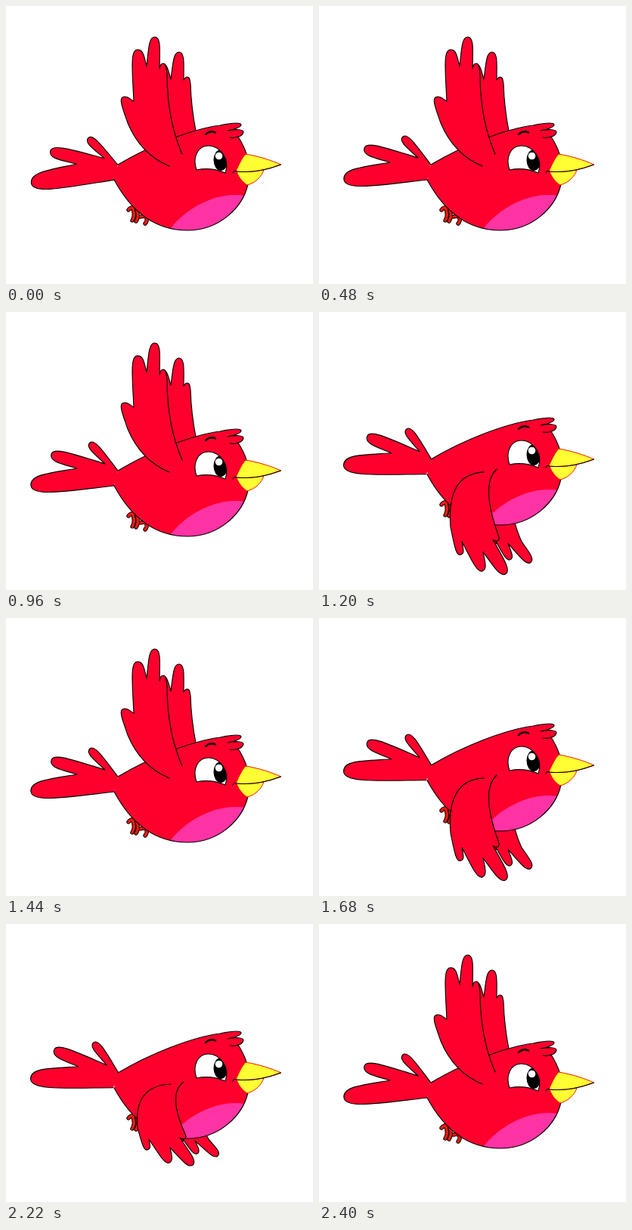
These frames come from a looping animation (406 by 368 pixels, 2.43 s). An HTML page:

```html
<!DOCTYPE html>
<html lang="en">
<head>
<meta charset="utf-8">
<title>Flying bird</title>
<style>
  html, body { margin: 0; width: 100%; height: 100%; overflow: hidden; background: #fff; }
  svg { display: block; width: 100vw; height: 100vh; }
  .red { fill: #ff002d; }
  .line { stroke: #000; stroke-width: 1.15; stroke-linejoin: round; stroke-linecap: round; }
  .bare { fill: none; }
  .toes { fill: none; stroke: #000; stroke-width: 5.4; stroke-linecap: round; stroke-linejoin: round; }
  .skin { stroke: #f01a0c; stroke-width: 3.4; }
  .beak { fill: #ffff33; stroke: #f01800; stroke-width: 1; stroke-linejoin: round; }
</style>
</head>
<body>
<svg viewBox="0 0 406 368">
  <defs>
    <path id="shape" d="M148 210C190 185 245 163 283 158C298 155 310 154 311 157C311 160 303 163 293 165C304 163 314 163 314 167C313 171 309 173 307 173C312 181 316 189 318 196L320 236C313 267 282 297 240 297C197 297 165 271 143 230"/>
    <path id="toes" d="M176 269Q166 264 162 270M168 269Q171 277 167 284M173 270Q176 279 172 285M178 279Q184 277 186 281Q187 285 184 288"/>
    <clipPath id="bodyClip"><use href="#shape"/></clipPath>
    <clipPath id="eyeClip"><path id="eyeHole"/></clipPath>
  </defs>
  <path id="far" class="red line"/>
  <g class="bob">
    <use href="#toes" class="toes"/>
    <use href="#toes" class="toes skin"/>
    <path id="tail" class="red line"/>
    <use href="#shape" class="red"/>
    <path d="M147 213L144 227" stroke="#ff002d" stroke-width="3"/>
    <path d="M218 294C240 265 282 245 316 251L310 300H218Z" fill="#ff33a3" clip-path="url(#bodyClip)"/>
    <use href="#shape" class="line bare"/>
    <path class="line bare" d="M307 173Q302 175 296 174"/>
    <path id="eye" class="line" fill="#fff"/>
    <g clip-path="url(#eyeClip)">
      <ellipse cx="284" cy="204" rx="9.500" ry="14"/>
      <circle cx="281.500" cy="198.500" r="4.800" fill="#fff"/>
    </g>
    <path id="brow" class="line bare" style="stroke-width:2.4" d="M264 170Q270 164 277 167.500"/>
    <path class="beak" d="M305 219C308 228 314 234 319 237C330 234 338 226 341 217Z"/>
    <path class="beak" d="M304 219C308 210 312 201 317 196C335 199 350 204 364 210C345 217 325 221 304 219Z"/>
    <path class="line bare" d="M300 221Q302 217 305 219C325 221 345 217 363 210"/>
  </g>
  <path id="near" class="red line"/>
</svg>
<script>
const STEP = 30, LOOP = 2430, FLAP = 16, BLINK = 1950;
const $ = id => document.getElementById(id);
const lerp = (a, b, k) => a + (b - a) * k;
const between = (p, q, k) => p.map((v, i) => lerp(v, q[i], k));
const ease = k => (1 - Math.cos(Math.PI * k)) / 2;
const points = s => s.split(' ').map(p => p.split(',').map(Number));

// One rounded feather from notch a over its tip to notch b.
function feather(a, tip, b) {
  const root = between(a, b, 0.5);
  const dx = tip[0] - root[0], dy = tip[1] - root[1];
  const length = Math.hypot(dx, dy) || 1;
  const round = (2 + 0.15 * length) / length;
  const shift = (p, k) => [p[0] - dy * round * k, p[1] + dx * round * k];
  const side = (a[0] - root[0]) * -dy + (a[1] - root[1]) * dx < 0 ? -1 : 1;
  return `C${shift(between(a, tip, 0.6), side / 2)} ${shift(tip, side)} ${tip}` +
         `C${shift(tip, -side)} ${shift(between(b, tip, 0.6), -side / 2)} ${b}`;
}

// Points alternate between notches and tips.
function feathers(pts) {
  let d = '';
  for (let i = 0; i + 2 < pts.length; i += 2) d += feather(pts[i], pts[i + 1], pts[i + 2]);
  return d;
}

// A wing has a curved edge on each side of its feathers.
const wing = pts =>
  `M${pts[0]}Q${pts[1]} ${pts[2]}${feathers(pts.slice(2, -2))}Q${pts.at(-2)} ${pts.at(-1)}`;

const up = {
  near: points('233,196 213,150 213,90 208,76 203,83 197,41 186,80 173,58 169,126 154,121 161,155 178,196 216,212'),
  far: points('251,165 245,135 244,103 240,94 235,98 229,61 218,97 207,77 206,110 210,150 225,180'),
  bob: 0, tilt: 0
};
const rise = {
  near: points('235,209 213,225 237,278 237,284 230,283 247,319 217,296 216,316 189,285 187,299 174,270 168,214 218,212'),
  far: points('258,262 262,275 268,285 280,307 250,287 253,304 234,285 232,288 230,275 230,258 232,240'),
  bob: -13, tilt: 6
};
const stretch = pts => pts.map(([x, y]) => [x, 203 + (y - 205) * 1.26]);
const down = { near: stretch(rise.near), far: stretch(rise.far), bob: -15, tilt: 6 };

const tail = points('143,230 33,230 94,207 60,188 131,201 111,173 148,210');
$('tail').setAttribute('d', `M${tail[0]}${feathers(tail)}`);

function flap(p) {
  if (p < 8) return [up, down, ease(p / 8)];
  if (p < 10) return [down, rise, (p - 8) / 2];
  return [rise, up, ease((p - 10) / 6)];
}

// shut: 0 open, 1 squinting, 2 closed
function eyeShape(shut) {
  const low = 217 - 7 * shut, top = 185 + 9 * shut, tall = low - top;
  return `M252 ${low}C246 ${low - tall * 0.55} 254 ${top} 268 ${top}` +
         `C282 ${top} 297 ${top + tall * 0.53} 290 ${low + 4}Q271 ${low - 4} 252 ${low}`;
}

const bobbing = document.querySelector('.bob');

function draw(now) {
  const step = Math.floor(now % LOOP / STEP);
  const [a, b, k] = flap(step % FLAP);
  for (const id of ['near', 'far'])
    $(id).setAttribute('d', wing(a[id].map((p, i) => between(p, b[id][i], k))));

  const settle = Math.max(0, 1 - step / 3);
  bobbing.setAttribute('transform', `translate(0 ${lerp(a.bob, b.bob, k)})`);
  $('tail').setAttribute('transform', `rotate(${lerp(a.tilt, b.tilt, k) - 2.5 * settle} 145 220)`);

  const shut = Math.max(0, 2 - Math.abs(step * STEP - BLINK) / STEP);
  for (const id of ['eye', 'eyeHole']) $(id).setAttribute('d', eyeShape(shut));
  $('brow').setAttribute('transform', `translate(0 ${shut * 4})`);
}

function tick() {
  draw(performance.now());
  requestAnimationFrame(tick);
}
tick();
</script>
</body>
</html>
```
